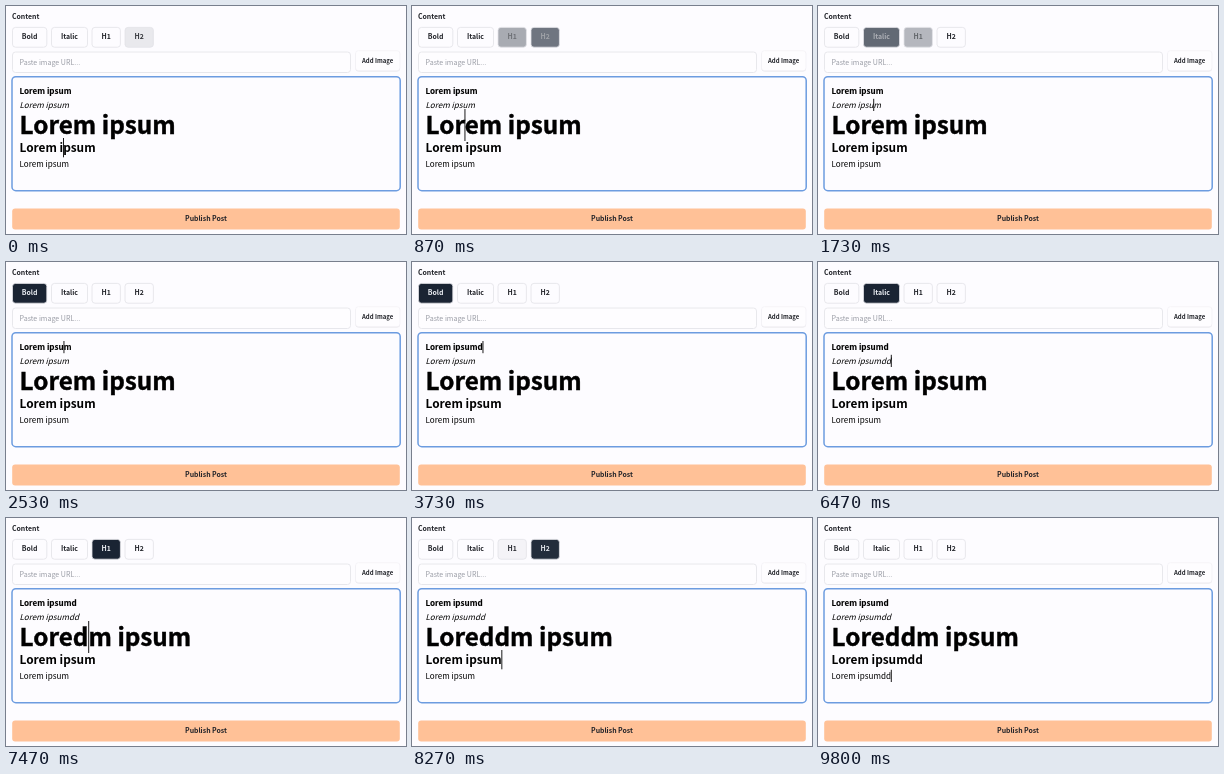
Write an HTML page that moves like this. It is 400 px wide and 228 px high and loops after 10 s.

```html
<!DOCTYPE html>
<html lang="en">
<head>
<meta charset="utf-8">
<title>Post editor</title>
<style>
  html, body { margin: 0; width: 100%; height: 100%; overflow: hidden; background: #fdfcff; }
  svg { display: block; width: 100vw; height: 100vh; }
  text {
    font-family: "Noto Sans CJK JP", "Noto Sans CJK SC", "Noto Sans CJK KR", "Noto Sans CJK TC", "Noto Sans CJK", "Noto Sans", sans-serif;
    fill: #000;
  }
  .ui { font-size: 6.9px; font-weight: 600; fill: #202228; }
  .mid { text-anchor: middle; }
  .hint { font-size: 7.1px; fill: #9a9da6; }
</style>
</head>
<body>
<svg id="stage" viewBox="0 0 400 228">
  <rect width="400" height="228" fill="#fdfcff"/>
  <text class="ui" x="6" y="12.5">Content</text>
  <g id="tools"></g>
  <rect x="6.5" y="46" width="338" height="20.5" rx="3" fill="#fefdff" stroke="#e2e2e8" stroke-width=".8"/>
  <text class="hint" x="13.5" y="58.8">Paste image URL...</text>
  <rect x="349.5" y="45.4" width="44.5" height="20" rx="3" fill="#e6e5ea"/>
  <rect x="349.5" y="44.7" width="44.5" height="20" rx="3" fill="#fefdff" stroke="#f0eff4" stroke-width=".6"/>
  <text class="ui mid" x="371.6" y="57" style="font-size:6px">Add Image</text>
  <rect x="6" y="70.7" width="388.2" height="114" rx="3.8" fill="#fdfcff" stroke="#6c9ce0" stroke-width="1.5"/>
  <g id="doc"></g>
  <rect id="caret" width=".9" fill="#000"/>
  <rect x="6.2" y="202.6" width="387.6" height="20.8" rx="3" fill="#ffc197"/>
  <text class="ui mid" x="200" y="215">Publish Post</text>
</svg>
<script>
const LOOP = 10000, BLINK = 500, FADE = 300, LEFT = 13.5;
const LIGHT = [253, 252, 255], DARK = [26, 36, 51];
const INK = [32, 34, 40], PALE = [238, 241, 246];
const BOLD = 0, ITALIC = 1, H1 = 2, H2 = 3, PLAIN = 4;
const BASE = "Lorem ipsum";

const $ = id => document.getElementById(id);
function add(parent, tag, attrs, label = "") {
  const node = document.createElementNS("http://www.w3.org/2000/svg", tag);
  for (const key in attrs) node.setAttribute(key, attrs[key]);
  node.textContent = label;
  return parent.appendChild(node);
}

const tools = [["Bold", 6.5, 34.3], ["Italic", 45.5, 36], ["H1", 86, 28.4], ["H2", 119, 28.4]]
  .map(([label, x, width]) => ({
    box: add($("tools"), "rect", { x, y: 21.4, width, height: 19.8, rx: 3, stroke: "#e2e2e8", "stroke-width": .8 }),
    label: add($("tools"), "text", { class: "ui mid", x: x + width / 2, y: 33.4 }, label)
  }));

// baseline, size, weight, style, outline, caret top, caret bottom, insertion point
const lines = [
  [88, 8.1, 700, "normal", .12, 79, 91.2, 11],
  [101.6, 8.1, 400, "italic", 0, 92.8, 105, 11],
  [127.5, 24.3, 700, "normal", .4, 103, 135, 4],
  [146, 11.85, 600, "normal", 0, 132, 151.3, 11],
  [160.5, 8.1, 400, "normal", 0, 151.8, 164, 11]
].map(([y, size, weight, style, outline, top, bottom, at]) => ({
  top, bottom, at,
  node: add($("doc"), "text", {
    x: LEFT, y, "font-size": size, "font-weight": weight, "font-style": style,
    stroke: "#000", "stroke-width": outline
  }, BASE)
}));

// time, line, caret index, letters inserted so far
const steps = [
  [-50, H2, 7, 0], [780, H1, 3, 0], [1600, ITALIC, 10, 0],
  [2200, BOLD, 10, 0], [2770, BOLD, 11, 0], [3670, BOLD, 12, 1], [3970, BOLD, 13, 2],
  [4870, BOLD, 12, 1], [4970, BOLD, 12, 1],
  [5600, ITALIC, 11, 0], [6190, ITALIC, 12, 1], [6450, ITALIC, 13, 2],
  [6830, H1, 4, 0], [7390, H1, 5, 1], [7660, H1, 6, 2],
  [8045, H2, 11, 0], [8470, H2, 12, 1], [8720, H2, 13, 2],
  [9130, PLAIN, 11, 0], [9500, PLAIN, 12, 1], [9790, PLAIN, 13, 2]
];

// cubic-bezier(.4, 0, .2, 1)
function ease(p) {
  if (p >= 1) return 1;
  let lo = 0, hi = 1, s = 0;
  for (let i = 0; i < 20; i++) {
    s = (lo + hi) / 2;
    const x = 1.2 * (1 - s) ** 2 * s + .6 * (1 - s) * s * s + s ** 3;
    if (x < p) lo = s; else hi = s;
  }
  return s * s * (3 - 2 * s);
}

const mix = (a, b, k) => `rgb(${a.map((v, i) => Math.round(v + (b[i] - v) * k))})`;

function paintTool(tool, level) {
  tool.box.setAttribute("fill", mix(LIGHT, DARK, level));
  tool.label.style.fill = mix(INK, PALE, level);
}

function render(t) {
  const counts = [0, 0, 0, 0, 0];
  let line = PLAIN, prev = PLAIN, switched = 0, since = 0, index = 0;
  for (const [time, target, pos, count] of steps) {
    if (time > t) break;
    if (target !== line) { prev = line; line = target; switched = time; }
    since = time;
    index = pos;
    counts[target] = count;
  }

  lines.forEach(({ node, at }, i) => {
    const text = BASE.slice(0, at) + "d".repeat(counts[i]) + BASE.slice(at);
    if (node.textContent !== text) node.textContent = text;
  });

  const k = ease((t - switched) / FADE);
  tools.forEach((tool, i) => paintTool(tool, i === line ? k : i === prev ? 1 - k : 0));

  const { node, top, bottom } = lines[line], caret = $("caret");
  caret.setAttribute("x", LEFT + node.getSubStringLength(0, index) - .2);
  caret.setAttribute("y", top);
  caret.setAttribute("height", bottom - top);
  caret.setAttribute("opacity", Math.floor((t - since) / BLINK) % 2 ? 0 : 1);
}

function tick() {
  render(performance.now() % LOOP);
  requestAnimationFrame(tick);
}
tick();
</script>
</body>
</html>
```
